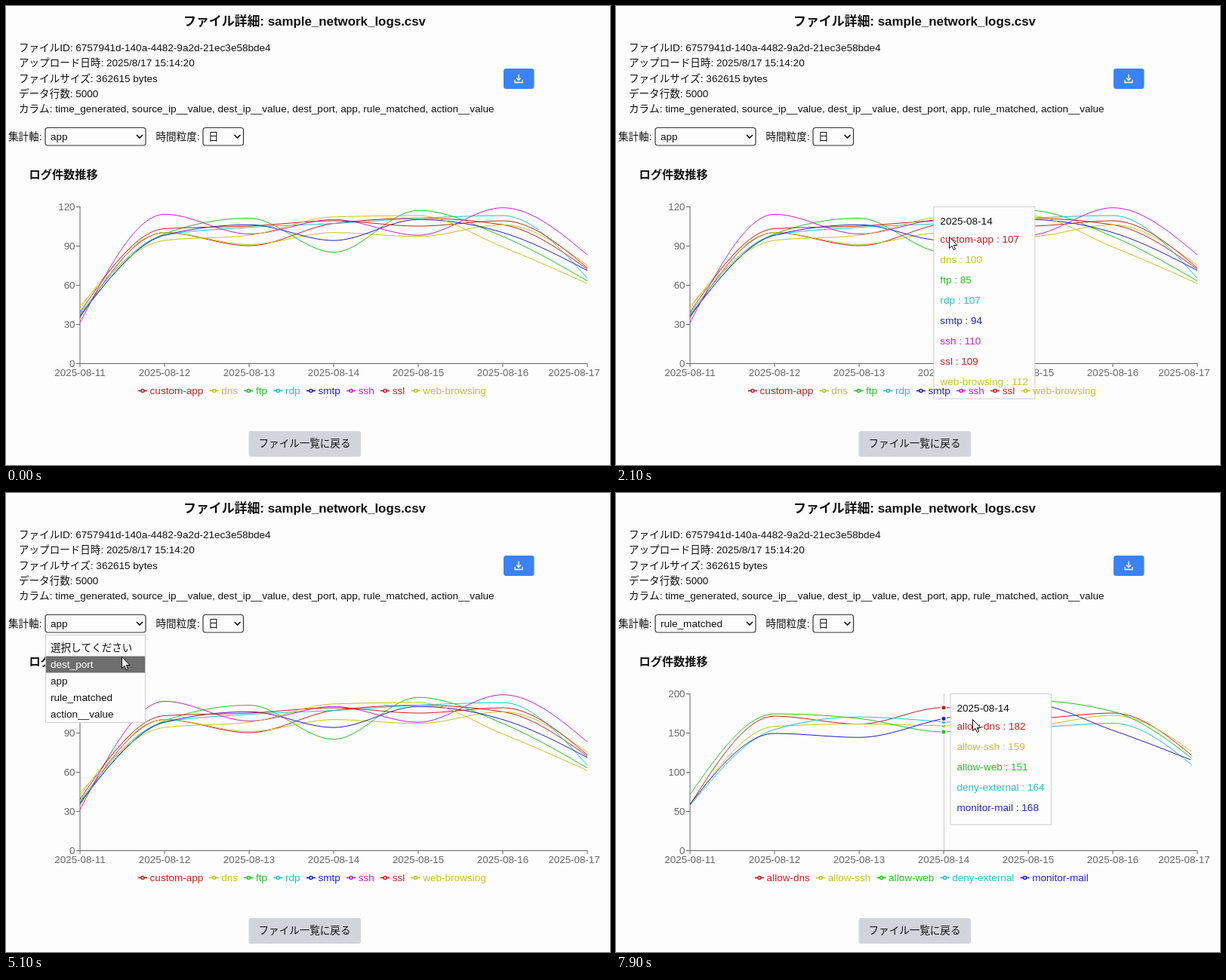
An HTML page with a canvas for the animation above (8000 ms loop, 800 px wide and 609 px high).

```html
<!DOCTYPE html>
<html lang="ja">
<head>
<meta charset="utf-8">
<title>ログ件数推移</title>
<style>
  html, body { margin: 0; width: 100%; height: 100%; overflow: hidden; background: #fdfdfd; }
  canvas { display: block; }
</style>
</head>
<body>
<canvas id="stage" width="800" height="609"></canvas>
<script>
const ctx = document.getElementById('stage').getContext('2d');
const LOOP = 8000, OPEN = 4500, PICK = 6620, DRAW = 1500, SLIDE = 400;
const BG = '#fdfdfd', INK = '#111', GREY = '#666', PALE = '#ccc';
const FAMILY = '"Liberation Sans", Arial, "Noto Sans CJK JP", "Noto Sans CJK", sans-serif';
const BODY = 13.55, TICK = 13.35;
const LEFT = 98, RIGHT = 770, TOP = 266, BASE = 474, STEP = 112, GAP = 8.5;
const OPTIONS = ['選択してください', 'dest_port', 'app', 'rule_matched', 'action__value'];

const hue = i => `hsl(${i * 60} 70% 45%)`;
const dayX = i => LEFT + i * STEP;
const dayName = i => `2025-08-${11 + i}`;

// Monotone cubic through the given points
function spline(xs, ys) {
  const n = xs.length, m = [];
  const h = i => xs[i + 1] - xs[i];
  const s = i => (ys[i + 1] - ys[i]) / h(i);
  for (let i = 1; i < n - 1; i++) {
    const a = s(i - 1), b = s(i);
    const p = (a * h(i) + b * h(i - 1)) / (h(i - 1) + h(i));
    m[i] = (Math.sign(a) + Math.sign(b)) * Math.min(Math.abs(a), Math.abs(b), Math.abs(p) / 2);
  }
  m[0] = (3 * s(0) - m[1]) / 2;
  m[n - 1] = (3 * s(n - 2) - m[n - 2]) / 2;
  return x => {
    let i = 0;
    while (i < n - 2 && x > xs[i + 1]) i++;
    const d = h(i), u = (x - xs[i]) / d, v = 1 - u;
    return ys[i] * v * v * (1 + 2 * u) + ys[i + 1] * u * u * (3 - 2 * u)
      + d * u * v * (m[i] * v - m[i + 1] * u);
  };
}

// The CSS "ease" curve
function ease(x) {
  if (x <= 0) return 0;
  if (x >= 1) return 1;
  let lo = 0, hi = 1;
  for (let k = 0; k < 24; k++) {
    const s = (lo + hi) / 2;
    if (0.75 * (1 - s) * s + s ** 3 < x) lo = s; else hi = s;
  }
  const r = 1 - lo;
  return 0.3 * r * r * lo + 3 * r * lo * lo + lo ** 3;
}

// Both groupings count the same rows, so the last series is the rest of each day's total
const TOTALS = [302, 806, 804, 824, 862, 839, 563];

function makeChart(max, legendX, rows, restName) {
  const known = Object.values(rows);
  rows[restName] = TOTALS.map((sum, d) => known.reduce((left, row) => left - row[d], sum));
  const toY = v => BASE - v / max * (BASE - TOP);
  const series = Object.entries(rows).map(([name, data], i) => {
    const at = spline(data.map((_, k) => dayX(k)), data.map(toY));
    const path = new Path2D();
    let length = 0;
    path.moveTo(LEFT, at(LEFT));
    for (let x = LEFT + 2; x <= RIGHT; x += 2) {
      path.lineTo(x, at(x));
      length += Math.hypot(2, at(x) - at(x - 2));
    }
    return { name, data, path, length, color: hue(i % 6) };
  });
  return { max, legendX, toY, series };
}

const byApp = makeChart(120, 175, {
  'custom-app': [35, 100, 90, 107, 111, 106, 72],
  'dns': [42, 100, 91, 100, 97, 106, 75],
  'ftp': [37, 99, 111, 85, 117, 97, 63],
  'rdp': [38, 98, 104, 107, 111, 113, 65],
  'smtp': [36, 98, 106, 94, 110, 100, 71],
  'ssh': [31, 114, 99, 110, 98, 119, 83],
  'ssl': [39, 103, 105, 109, 105, 109, 73]
}, 'web-browsing');
const byRule = makeChart(200, 184, {
  'allow-dns': [58, 171, 161, 182, 168, 175, 115],
  'allow-ssh': [57, 158, 161, 159, 159, 172, 121],
  'allow-web': [71, 174, 168, 151, 191, 177, 112],
  'deny-external': [57, 154, 170, 164, 157, 162, 103]
}, 'monitor-mail');
const chartAt = t => t < PICK ? byApp : byRule;
const isOpen = t => t >= OPEN && t < PICK;

// Mouse stops: time, x, y
const STOPS = [
  [600, 192, 190], [900, 202, 265], [1900, 378, 308], [2100, 441, 306],
  [3080, 714.4, 296], [3500, 714.4, 296], [4300, 150, 176], [4700, 150, 176],
  [5100, 153, 217], [6100, 146, 275], [PICK, 146, 275], [7500, 400, 297], [7900, 472, 300]
];
const column = k => STOPS.map(s => s[k]);
const mouseX = spline(column(0), column(1));
const mouseY = spline(column(0), column(2));
const ENTER = STOPS[0][0];

function setFont(size = BODY, bold = false) {
  ctx.font = `${bold ? 'bold ' : ''}${size}px ${FAMILY}`;
}
function text(s, x, y, color = INK, align = 'left') {
  ctx.fillStyle = color;
  ctx.textAlign = align;
  ctx.fillText(s, x, y);
}
function line(color, width, ...pts) {
  ctx.strokeStyle = color;
  ctx.lineWidth = width;
  ctx.beginPath();
  for (let i = 0; i < pts.length; i += 2) ctx.lineTo(pts[i], pts[i + 1]);
  ctx.stroke();
}
function paint(fill, stroke, width = 1) {
  ctx.fillStyle = fill;
  ctx.fill();
  if (!stroke) return;
  ctx.strokeStyle = stroke;
  ctx.lineWidth = width;
  ctx.stroke();
}
function box(x, y, w, h, r, fill, stroke, width) {
  ctx.beginPath();
  ctx.roundRect(x, y, w, h, r);
  paint(fill, stroke, width);
}
function dot(x, y, r, fill, stroke, width) {
  ctx.beginPath();
  ctx.arc(x, y, r, 0, 7);
  paint(fill, stroke, width);
}

const tipRow = (s, i) => `${s.name} : ${s.data[i]}`;
function tipWidth(chart, i) {
  setFont();
  return 18 + Math.max(...chart.series.map(s => ctx.measureText(tipRow(s, i)).width));
}
function tipTarget(chart, i) {
  const w = tipWidth(chart, i), x = dayX(i) + GAP;
  return x + w > RIGHT ? dayX(i) - GAP - w : x;
}
function hovered(t) {
  if (t < ENTER || isOpen(t)) return -1;
  const x = mouseX(t), y = mouseY(t);
  if (x < LEFT || x > RIGHT || y < TOP || y > BASE) return -1;
  return Math.round((x - LEFT) / STEP);
}
const tipX = (tip, t) => tip.from + (tip.to - tip.from) * ease((t - tip.t) / SLIDE);

// Every change of the hovered day, with the tooltip's slide
const tips = [{ t: 0, i: -1 }];
for (let t = 0; t < LOOP; t += 10) {
  const last = tips[tips.length - 1], i = hovered(t);
  if (i === last.i) continue;
  const to = i < 0 ? 0 : tipTarget(chartAt(t), i);
  tips.push({ t, i, to, from: last.i < 0 ? to : tipX(last, t) });
}

function drawSelect(x, w, label) {
  box(x + 0.5, 161.5, w, 23.5, 3.5, BG, '#333', 1.2);
  text(label, x + 7.5, 178);
  line(INK, 1.6, x + w - 11.5, 171, x + w - 7.5, 175, x + w - 3.5, 171);
}

function drawPage(t) {
  ctx.fillStyle = BG;
  ctx.fillRect(0, 0, 800, 609);
  setFont(16.9, true);
  text('ファイル詳細: sample_network_logs.csv', 395.5, 26, INK, 'center');
  setFont();
  [
    'ファイルID: 6757941d-140a-4482-9a2d-21ec3e58bde4',
    'アップロード日時: 2025/8/17 15:14:20',
    'ファイルサイズ: 362615 bytes',
    'データ行数: 5000',
    'カラム: time_generated, source_ip__value, dest_ip__value, dest_port, app, rule_matched, action__value'
  ].forEach((s, i) => text(s, 17, 60 + i * 20.3));

  box(659, 83, 40.5, 27, 3.5, '#3b82f6');
  line('#fff', 1.3, 679, 90.5, 679, 98);
  line('#fff', 1.3, 676, 95.5, 679, 98.5, 682, 95.5);
  line('#fff', 1.3, 674, 98, 674, 101.5, 684, 101.5, 684, 98);

  text('集計軸:', 3, 178);
  drawSelect(51.5, 133, t < PICK ? 'app' : 'rule_matched');
  text('時間粒度:', 198.5, 178);
  drawSelect(260.5, 53.5, '日');

  setFont(15.2, true);
  text('ログ件数推移', 30.5, 229);
  setFont();
  box(321.5, 564, 148.5, 34, 3, '#d1d5db');
  text('ファイル一覧に戻る', 395.5, 585, INK, 'center');
}

function drawAxes(chart) {
  setFont(TICK);
  line(GREY, 1, LEFT, TOP, LEFT, BASE + 0.5, RIGHT, BASE + 0.5);
  for (let k = 0; k <= 4; k++) {
    const y = BASE - k * (BASE - TOP) / 4;
    line(GREY, 1, LEFT - 5, y + 0.5, LEFT, y + 0.5);
    text(chart.max / 4 * k, LEFT - 6.5, y + 5, GREY, 'right');
  }
  for (let i = 0; i < 7; i++) {
    line(GREY, 1, dayX(i), BASE, dayX(i), BASE + 5);
    text(dayName(i), Math.min(dayX(i), 752.5), 491, GREY, 'center');
  }
}

function drawLines(chart, shown) {
  ctx.lineWidth = 1;
  for (const s of chart.series) {
    ctx.strokeStyle = s.color;
    if (shown < 1) ctx.setLineDash([s.length * shown, s.length * 2]);
    ctx.stroke(s.path);
  }
  ctx.setLineDash([]);
}

function drawLegend(chart) {
  setFont();
  let x = chart.legendX;
  for (const s of chart.series) {
    line(s.color, 1.7, x, 510.5, x + 12, 510.5);
    dot(x + 6, 510.5, 2, BG, s.color, 1.6);
    text(s.name, x + 15.6, 515, s.color);
    x += 15.4 + ctx.measureText(s.name).width + GAP;
  }
}

function drawTip(chart, tip, t) {
  const x = tipX(tip, t), i = tip.i;
  box(x + 0.5, TOP + 0.5, tipWidth(chart, i) - 0.5, 38.5 + 27 * chart.series.length, 0, BG, PALE);
  text(dayName(i), x + 9, 290);
  chart.series.forEach((s, k) => text(tipRow(s, i), x + 9, 314 + 27 * k, s.color));
}

function drawMenu(t) {
  const y = mouseY(t);
  const row = y < 190 ? 2 : Math.max(0, Math.min(4, Math.floor((y - 194.5) / 22)));
  box(52.5, 188.5, 132, 116, 0, BG, PALE);
  ctx.fillStyle = '#6e6e6e';
  ctx.fillRect(53, 194.5 + row * 22, 131, 22);
  OPTIONS.forEach((s, i) => text(s, 59, 209.5 + i * 22, i === row ? '#fff' : INK));
}

const ARROW = new Path2D('M0 0V15L3.4 11.8 5.8 17 8 16 5.7 11H10.4Z');
function drawMouse(t) {
  ctx.save();
  ctx.translate(mouseX(t) + 0.5, mouseY(t) + 0.5);
  ctx.fillStyle = '#fff';
  ctx.fill(ARROW);
  ctx.strokeStyle = INK;
  ctx.lineWidth = 1;
  ctx.stroke(ARROW);
  ctx.restore();
}

function draw(t) {
  const chart = chartAt(t);
  const tip = tips.filter(e => e.t <= t).pop();
  drawPage(t);
  drawAxes(chart);
  if (tip.i >= 0) line(PALE, 1, dayX(tip.i) + 0.5, TOP, dayX(tip.i) + 0.5, BASE);
  drawLines(chart, t < PICK ? 1 : ease((t - PICK) / DRAW));
  if (tip.i >= 0) {
    for (const s of chart.series) {
      dot(dayX(tip.i), chart.toY(s.data[tip.i]), 3.4, s.color, '#fff', 1.7);
    }
    drawTip(chart, tip, t);
  }
  drawLegend(chart);
  if (isOpen(t)) drawMenu(t);
  if (t >= ENTER) drawMouse(t);
}

function frame() {
  draw(Math.floor(performance.now() % LOOP / 100) * 100);
  requestAnimationFrame(frame);
}
frame();
</script>
</body>
</html>
```
